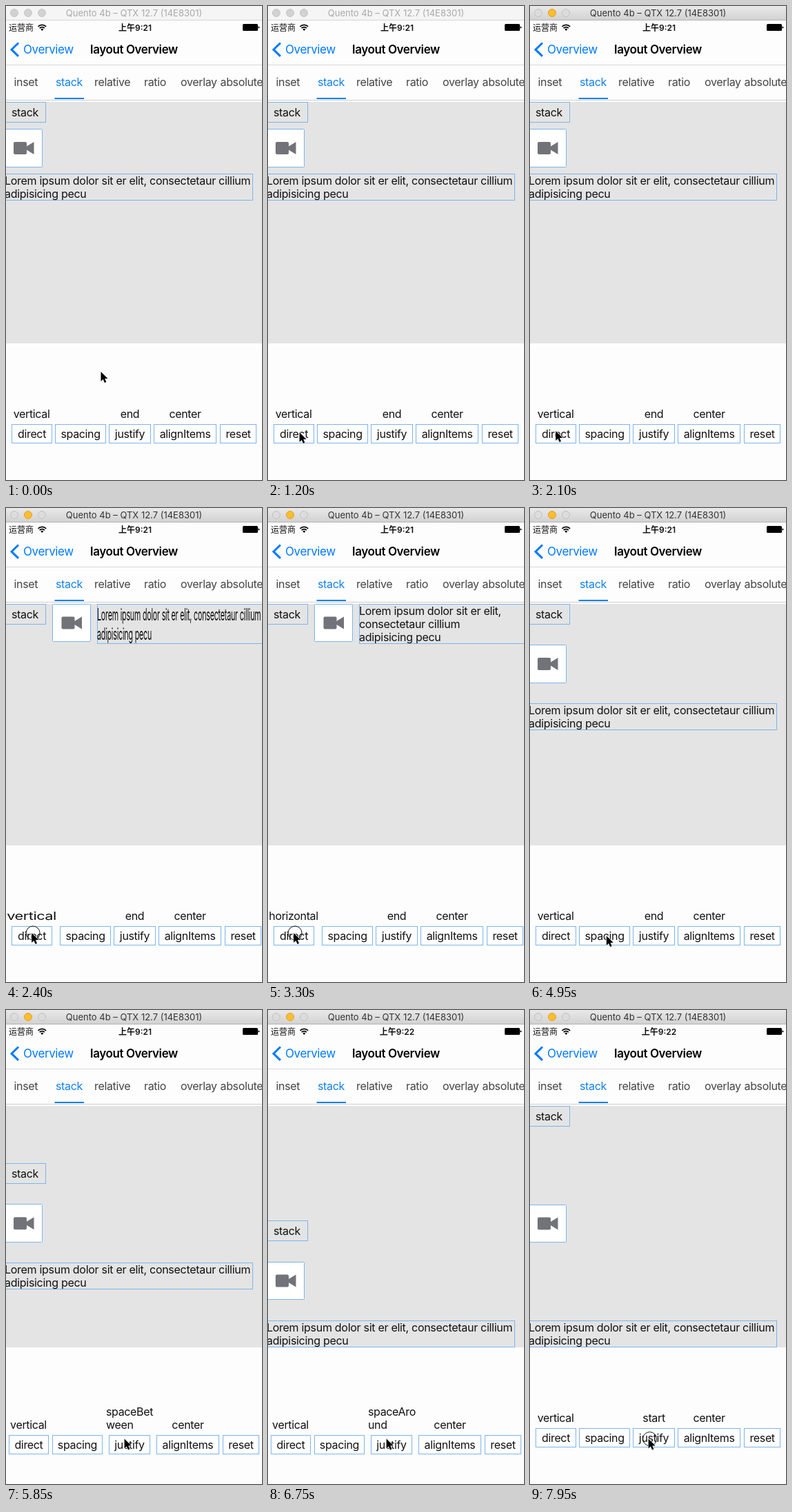
Write an HTML page that moves like this. It is 371 px wide and 687 px high and loops after 8000 ms.

```html
<!DOCTYPE html>
<html lang="en">
<head>
<meta charset="utf-8">
<title>Stack layout demo</title>
<style>
html, body { margin: 0; width: 100%; height: 100%; overflow: hidden; background: #fdfdfd; }
svg { display: block; width: 371px; height: 687px; }
text { font: 16px Inter, "Noto Sans CJK SC", "Noto Sans CJK", sans-serif; letter-spacing: -.35px; fill: #111; }
.mid { text-anchor: middle; }
.bar { font-size: 13px; letter-spacing: 0; fill: #a9a9a9; }
.status { font-size: 12px; letter-spacing: 0; }
.clock { font-weight: 600; }
.nav { font-size: 17px; letter-spacing: -.41px; }
.title { font-weight: 600; fill: #000; }
.tab { fill: #444; }
.nav.blue { fill: #007aff; }
.tab.blue { fill: #1281ea; }
.copy text { letter-spacing: -.29px; }
.box { fill: none; stroke: #7db4ec; }
.button { fill: #fff; stroke: #7db4ec; }
.dot { fill: #d2d2d2; stroke: #c6c6c6; }
.active .bar { fill: #333; }
.active .dot { fill: #dcdcdc; stroke: #c2c2c2; }
.active .dot.yellow { fill: #fdbd2e; stroke: #e0a02a; }
.active .chrome { fill: url(#chrome); }
.active .edge { fill: #b4b4b4; }
</style>
</head>
<body>
<svg viewBox="0 0 371 687">
  <defs>
    <linearGradient id="chrome" x2="0" y2="1">
      <stop stop-color="#e9e9e9"/><stop offset="1" stop-color="#d2d2d2"/>
    </linearGradient>
  </defs>
  <rect width="371" height="687" fill="#fdfdfd"/>

  <g id="window">
    <rect class="chrome" width="371" height="20" fill="#f5f5f5"/>
    <rect class="edge" y="20" width="371" height="1" fill="#d6d6d6"/>
    <circle class="dot" cx="12" cy="10" r="5.5"/>
    <circle class="dot yellow" cx="32" cy="10" r="5.5"/>
    <circle class="dot" cx="52" cy="10" r="5.5"/>
    <text class="bar mid" x="185.5" y="15">Quento 4b – QTX 12.7 (14E8301)</text>
  </g>

  <text class="status" x="4" y="35.5">运营商</text>
  <g fill="none" stroke="#000" stroke-width="1.8">
    <path d="M46.5 29.8a8.2 8.2 0 0 1 11.6 0M48.7 32.2a5.2 5.2 0 0 1 7.2 0"/>
    <path d="M52.3 36l-2-2.2a2.8 2.8 0 0 1 4 0z" fill="#000" stroke="none"/>
  </g>
  <text id="clock" class="status clock mid" x="187" y="35.5"></text>
  <rect x="343" y="26" width="22" height="10" rx="1.5"/>
  <path d="M365.5 29.5q2 .3 2 1.5t-2 1.5z"/>

  <path d="M18 53.5L8 63.2l10 9.7" fill="none" stroke="#007aff" stroke-width="3"/>
  <text class="nav blue" x="25" y="69">Overview</text>
  <text class="nav title mid" x="185.5" y="69">layout Overview</text>
  <rect y="85" width="371" height="1" fill="#d8d8d8"/>

  <text class="tab" x="11.5" y="116">inset</text>
  <text class="tab blue" x="72" y="116">stack</text>
  <text class="tab" x="128" y="116">relative</text>
  <text class="tab" x="200" y="116">ratio</text>
  <text class="tab" x="253" y="116">overlay</text>
  <text class="tab" x="310.5" y="116">absolute</text>
  <rect x="70.5" y="133" width="42.5" height="2" fill="#1281ea"/>
  <rect y="136" width="371" height="1" fill="#ccc"/>
  <rect y="139" width="371" height="350" fill="#e4e4e4"/>

  <g id="stack">
    <rect class="box" x="-.5" y=".5" width="58" height="29"/>
    <text x="8" y="21">stack</text>
  </g>
  <g id="photo">
    <rect id="frame" class="box" x="-2.5" y=".5" width="55" rx="1" style="fill:#fff"/>
    <g id="camera" fill="#717379">
      <rect x="11" y="19" width="19" height="18" rx="2"/>
      <path d="M29 26l11.5-7v18L29 30z"/>
    </g>
  </g>
  <g id="para">
    <rect class="box" x=".5" y=".5"/>
    <g class="copy"><text y="16"></text><text y="35"></text><text y="54"></text></g>
  </g>

  <g id="controls"></g>

  <g id="cursor">
    <circle id="ring" cx="1.9" r="10" fill="none" stroke="#111"/>
    <path d="M0 0v14l3.2-3 2.2 5 2.4-1-2.1-5h4.3z" stroke="#fff" stroke-width="1.2" paint-order="stroke"/>
  </g>
</svg>
<script>
const $ = id => document.getElementById(id);
const place = (el, x, y) => el.setAttribute('transform', `translate(${x} ${y})`);
const { floor, round } = Math;
const LOOP = 8000, STEP = 150;

const names = ['direct', 'spacing', 'justify', 'alignItems', 'reset'];
const widths = [57.9, 72.9, 59.9, 90, 52];
const columns = {
  base: [8.6, 71.6, 149.6, 214.6, 310.6],
  horizontal: [8.6, 78.6, 156.6, 221.6, 317.6],
  tall: [4, 67, 149, 218.5, 314.5]
};

// time, x, y
const path = [
  [0, 137.5, 530], [150, 136, 531.5], [1050, 44.6, 618.5], [1200, 45.6, 618],
  [1650, 45.6, 618], [2100, 37.2, 616], [3450, 37.2, 616], [3900, 107, 620],
  [4200, 110.8, 620], [4950, 110.8, 620], [5100, 138, 624], [5250, 171.6, 621.6], [LOOP, 171.6, 621.6]
];
// ring visible from, to
const clicks = [
  [1950, 2100], [2250, 2550], [3300, 3450], [4200, 4350], [4800, 4950],
  [5700, 5850], [6600, 6750], [7200, 7350], [7950, LOOP]
];
const justify = [
  { at: 0, mode: 'start', label: ['end'] },
  { at: 5850, mode: 'center', label: ['spaceBet', 'ween'] },
  { at: 6750, mode: 'end', label: ['spaceAro', 'und'] },
  { at: 7350, mode: 'spaceBetween', label: ['start'] }
];
const lorem = {
  wide: ['Lorem ipsum dolor sit er elit, consectetaur cillium', 'adipisicing pecu', ''],
  narrow: ['Lorem ipsum dolor sit er elit,', 'consectetaur cillium', 'adipisicing pecu']
};

// Text is redrawn one step after its box changes and is stretched until then.
const isHorizontal = t => t >= 2400 && t < 3450;
const isRedrawn = t => isHorizontal(t - STEP);

function pointer(t) {
  const i = path.findIndex(p => p[0] > t);
  const [t0, x0, y0] = path[i - 1], [t1, x1, y1] = path[i];
  const k = (t - t0) / (t1 - t0), e = k * k * (3 - 2 * k);
  return [x0 + (x1 - x0) * e, y0 + (y1 - y0) * e];
}

function drawStack(t, mode) {
  const horizontal = isHorizontal(t), narrow = isRedrawn(t);
  const gap = t < 4350 ? 10 : t < 4950 ? 20 : 30;
  const free = 350 - 123.5 - 2 * gap;
  const y = 139 + (mode === 'center' ? free / 2 : mode === 'end' ? free : 0);
  const space = mode === 'spaceBetween' ? 113.5 : gap;
  const photoX = horizontal ? 69.5 : 0;
  const photoY = horizontal ? y : y + 29.5 + space;
  const paraY = horizontal ? y : photoY + 55 + space;

  place($('stack'), 0, floor(y));
  place($('photo'), round(photoX), floor(photoY));
  place($('camera'), photoX - round(photoX), photoY - floor(photoY) - .5);
  $('frame').setAttribute('height', floor(photoY + 54.9) - floor(photoY));
  place($('para'), horizontal ? 132 : -2, floor(paraY));

  const [frame, copy] = $('para').children;
  frame.setAttribute('width', horizontal ? 240 : 359);
  frame.setAttribute('height', horizontal ? 57 : 38);
  copy.setAttribute('transform',
    narrow === horizontal ? '' : horizontal ? 'scale(.667 1.5)' : 'scale(1.5 .667)');
  lorem[narrow ? 'narrow' : 'wide'].forEach((line, i) => copy.children[i].textContent = line);
}

function drawControls(t, label) {
  const horizontal = isHorizontal(t), redrawn = isRedrawn(t);
  const tall = label.length > 1;
  const xs = columns[horizontal ? 'horizontal' : tall ? 'tall' : 'base'];
  const top = tall ? 616 : 606, base = top - 9;
  const centre = i => xs[i] + widths[i] / 2;
  const text = (s, x, y, cls = 'mid', extra = '') => `<text class="${cls}" x="${x}" y="${y}" ${extra}>${s}</text>`;

  const scale = redrawn === horizontal ? 1 : horizontal ? 1.36 : .73;
  const direct = text(redrawn ? 'horizontal' : 'vertical', 0, 0, 'mid',
    `transform="translate(${centre(0) - .5} ${base}) scale(${scale} 1)"`);
  const state = tall
    ? text(label[0], 145, base - 19, '') + text(label[1], 145, base, '')
    : text(label[0], centre(2), base);
  const buttons = names.map((name, i) => {
    const left = floor(xs[i]), width = floor(xs[i] + widths[i]) - left;
    return `<rect class="button" x="${left + .5}" y="${top + .5}" width="${width}" height="27"/>` +
      text(name, centre(i), top + 20);
  }).join('');
  $('controls').innerHTML = direct + state + text('center', centre(3), base) + buttons;
}

function draw(t) {
  const { mode, label } = justify.filter(j => j.at <= t).pop();
  $('window').classList.toggle('active', t >= 1950);
  $('clock').textContent = t < 6000 ? '上午9:21' : '上午9:22';
  drawStack(t, mode);
  drawControls(t, label);
  place($('cursor'), ...pointer(t));
  $('ring').style.display = clicks.some(([a, b]) => t >= a && t < b) ? '' : 'none';
}

const start = performance.now();
let shown = -1;
function tick() {
  const t = floor((performance.now() - start) % LOOP / STEP) * STEP;
  if (t !== shown) draw(shown = t);
  requestAnimationFrame(tick);
}
tick();
</script>
</body>
</html>
```
